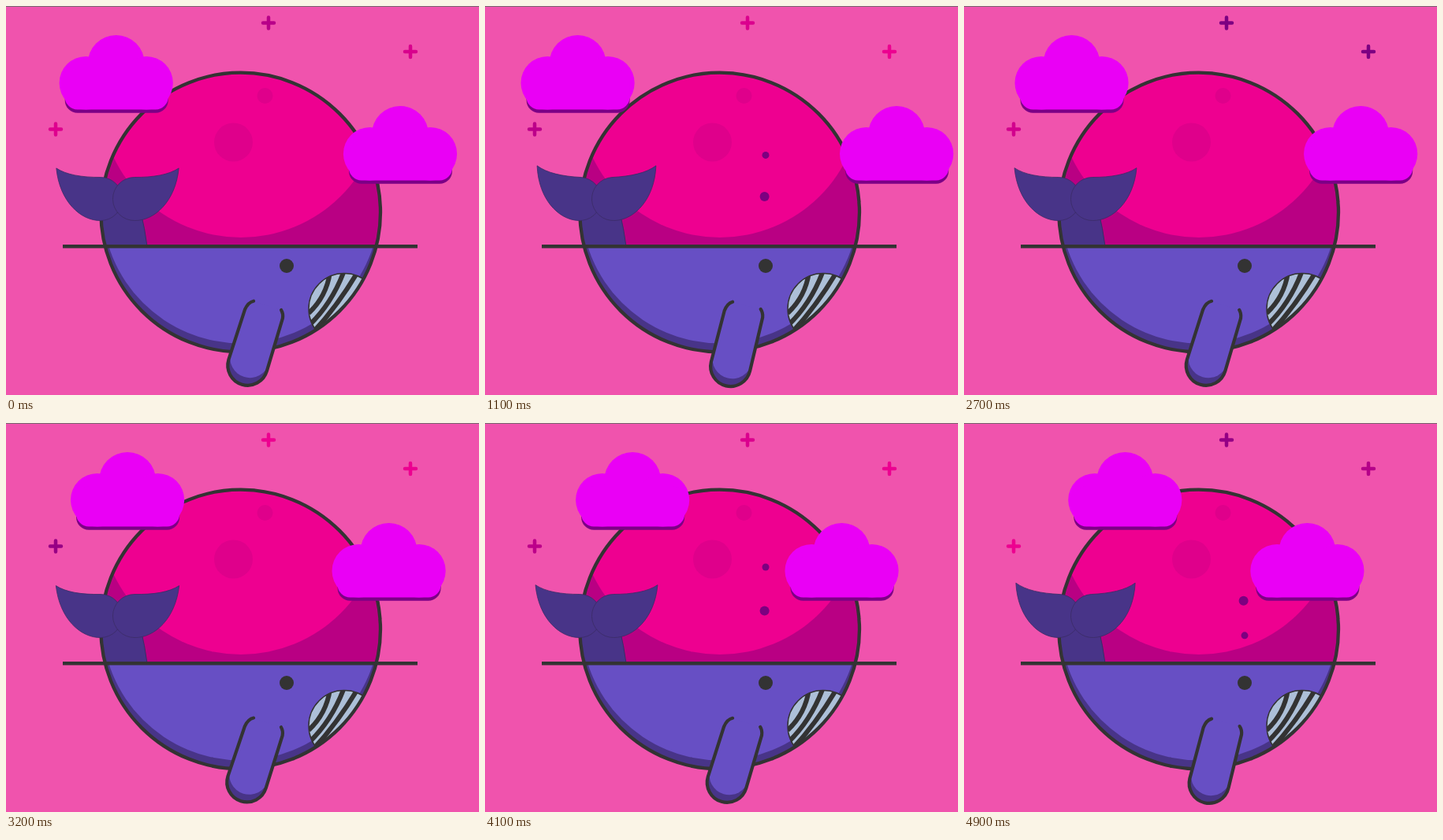
Animation of 600 by 494 pixels, one loop 5000 ms. Source, as an HTML page:

```html
<!DOCTYPE html>
<html lang="en">
<head>
<meta charset="utf-8">
<title>Whale planet</title>
<style>
  html, body { margin: 0; width: 100%; height: 100%; overflow: hidden; background: #f053ad; }
  svg { display: block; width: 100vw; height: 100vh; }
</style>
</head>
<body>
<svg viewBox="0 0 600 494">
  <defs>
    <clipPath id="planet"><circle cx="297.7" cy="262" r="177"/></clipPath>
    <clipPath id="sea"><rect x="100" y="305" width="400" height="150"/></clipPath>
    <clipPath id="mouth"><circle cx="429" cy="384.5" r="45"/></clipPath>
    <path id="fin" d="M-16.3 4.6Q-22.500 8-23.800 18L-25.300 85A25.300 25.300 0 0 0 25.300 85V15Q24.500 9 20.500 5.400"/>
    <clipPath id="finClip"><use href="#fin"/></clipPath>
    <path id="plus" d="M-7 0H7M0-7V7" stroke-width="4.500" stroke-linecap="round"/>
    <path id="fluke" d="M63.300 206.700C76 215 96 218 120 217.500A27.500 27.500 0 0 1 120 272.500C95 273 68 249 63.300 206.700Z"
      fill="#483488" stroke="#3b2c66" stroke-width=".8"/>
    <g id="cloud">
      <rect x="74" y="100" width="131" height="35.700" rx="16" fill="#7c0086"/>
      <g fill="#ea00f5">
        <circle cx="100.700" cy="97.700" r="33.800"/>
        <circle cx="139" cy="73" r="36"/>
        <circle cx="177.300" cy="97.700" r="33.800"/>
        <rect x="74" y="80" width="131" height="51.500" rx="16"/>
      </g>
    </g>
  </defs>

  <rect width="600" height="494" fill="#f053ad"/>
  <rect width="600" height="1" fill="#77686f"/>
  <use class="plus" href="#plus" x="333" y="21.500"/>
  <use class="plus" href="#plus" x="513" y="58"/>
  <use class="plus" href="#plus" x="63" y="156.500"/>

  <g clip-path="url(#planet)">
    <rect x="100" y="80" width="400" height="370" fill="#b90083"/>
    <circle cx="298" cy="115" r="179" fill="#ee0090"/>
    <g fill="#df008b">
      <circle cx="288.500" cy="173" r="24.500"/>
      <circle cx="328.500" cy="114" r="10"/>
    </g>
    <g fill="#7c0080">
      <circle id="big" cx="354.600" r="6"/>
      <circle id="small" cx="356" r="4.500"/>
    </g>
    <path d="M110 262H171Q176 282 179 305H110Z" fill="#483488" stroke="#3b2c66"/>
    <g clip-path="url(#sea)">
      <rect x="100" y="305" width="400" height="150" fill="#483488"/>
      <circle cx="298" cy="252.500" r="175.800" fill="#674fc4"/>
    </g>
    <g clip-path="url(#mouth)">
      <rect x="380" y="335" width="100" height="100" fill="#adc0d8"/>
      <path d="M411 338Q406.500 369 384 390M429 336Q413.500 378 384 406M446 338Q418 385 386 418"
        fill="none" stroke="#333" stroke-width="6"/>
    </g>
    <circle cx="429" cy="384.500" r="45" fill="none" stroke="#333" stroke-width="1.500"/>
  </g>
  <circle cx="297.700" cy="262" r="177.300" fill="none" stroke="#333" stroke-width="4.300"/>
  <use id="left" href="#fluke"/>
  <g transform="matrix(-1 0 0 1 283 0)"><use id="right" href="#fluke"/></g>
  <path d="M72 305.300H522" stroke="#333" stroke-width="4.500"/>
  <circle cx="356" cy="330" r="9" fill="#333"/>

  <g id="flipper">
    <g clip-path="url(#finClip)">
      <rect x="-30" y="60" width="60" height="55" fill="#483488"/>
      <use href="#fin" y="-10" fill="#674fc4"/>
    </g>
    <use href="#fin" fill="none" stroke="#333" stroke-width="4.200" stroke-linecap="round"/>
  </g>

  <use id="cloudA" href="#cloud"/>
  <use id="cloudB" href="#cloud"/>
</svg>
<script>
const get = id => document.getElementById(id);
const set = (id, name, value) => get(id).setAttribute(name, value);
const pluses = document.querySelectorAll('.plus');
const peaks = [0.24, 0.15, 0.87];
const bright = [238, 0, 144], dark = [123, 0, 130];

// The ease-in-out curve, cubic-bezier(.42, 0, .58, 1)
function ease(p) {
  p = Math.min(1, Math.max(0, p));
  let s = p;
  for (let i = 0; i < 6; i++)
    s -= (((0.52 * s - 0.78) * s + 1.26) * s - p) / ((1.56 * s - 1.56) * s + 1.26);
  return s * s * (3 - 2 * s);
}

// Eased swing: 1 at time peak, 0 half a period later
function swing(t, period, peak) {
  const d = Math.abs((t - peak) / period - Math.round((t - peak) / period));
  return ease(1 - 2 * d);
}

// Height of a drop that rises from start to peak, then falls until end
function drop(t, start, peak, end, top) {
  const period = 2.965, u = (t - start + period) % period + start;
  const rise = u < peak ? ease((u - start) / (peak - start)) : ease((end - u) / (end - peak));
  return 330 + (top - 330) * rise;
}

function draw(now) {
  const t = now / 1000 % 5;

  const drift = 44.6 + 90.5 * (1 - swing(t, 8, 1.4));
  set('cloudA', 'x', drift - 67);
  set('cloudB', 'x', 428.7 - drift);
  set('cloudB', 'y', 90);

  const s = swing(t, 4, 1.4);
  set('flipper', 'transform', `translate(331 375) rotate(${17.5 - 4.4 * s})`);
  for (const side of ['left', 'right'])
    set(side, 'transform', `rotate(${4.2 * s} 120 245)`);

  set('big', 'cy', drop(t, -0.04, 1.71, 2.66, 212));
  set('small', 'cy', drop(t, 0.6, 1.23, 2.48, 176));

  pluses.forEach((plus, i) => {
    const k = swing(t, 1, peaks[i]);
    plus.setAttribute('stroke', `rgb(${dark.map((c, j) => Math.round(c + (bright[j] - c) * k))})`);
  });
}

let begin;
function frame(now) {
  begin ??= now;
  draw(now - begin);
  requestAnimationFrame(frame);
}
draw(0);
requestAnimationFrame(frame);
</script>
</body>
</html>
```
